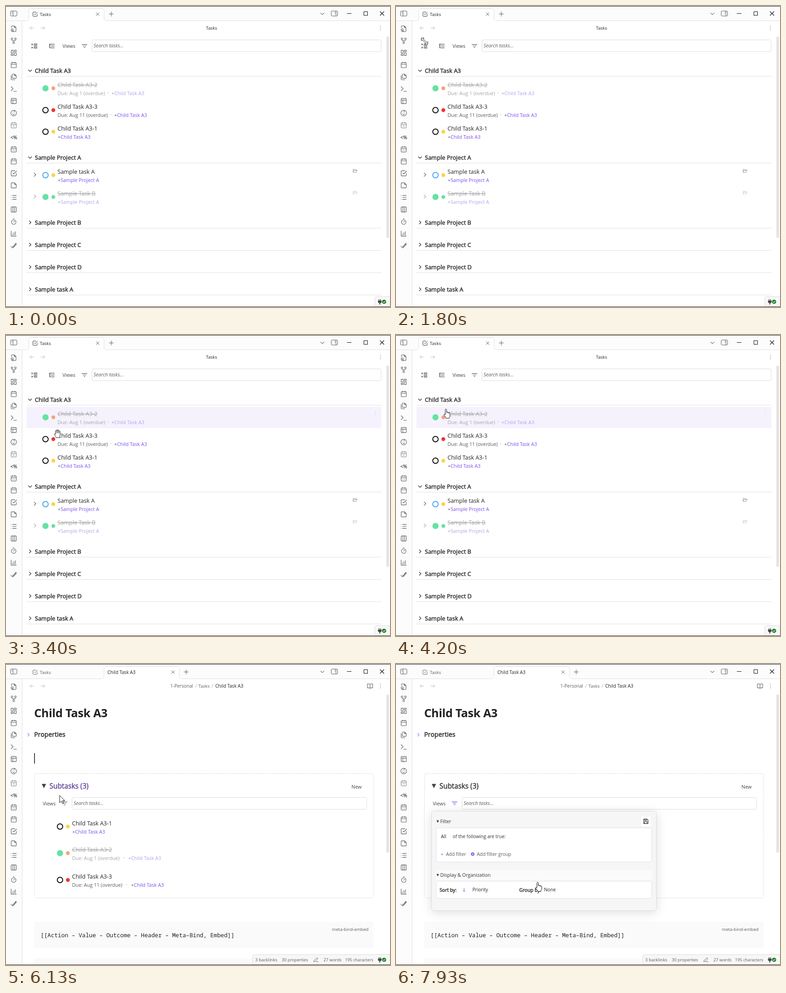
These frames come from a looping animation (846x662 px, 8000 ms). An HTML page:

```html
<!DOCTYPE html>
<html lang="en">
<head>
<meta charset="utf-8">
<title>Tasks</title>
<style>
  html, body { margin: 0; width: 100%; height: 100%; overflow: hidden; background: #fff; }
  svg { display: block; font-family: "Open Sans", "Noto Sans", sans-serif; }
  text { white-space: pre; }
  [data-on] { opacity: 0; }
  #cursor path { fill: #fff; stroke: #111; stroke-width: 1; stroke-linejoin: round; }
  #popup > rect:first-child { filter: drop-shadow(0 4px 11px rgba(0, 0, 0, .13)); }
</style>
</head>
<body>
<svg id="stage" width="846" height="662" viewBox="0 0 846 662"></svg>
<script>
const LOOP = 8000;
const INK = '#222', GREY = '#5c5c5c', FAINT = '#a5a5a5', LINE = '#e0e0e0';
const VIOLET = '#7a4ff0', HOVER = '#5b3f8f', PALE = '#b8a0f0';
const GREEN = '#65e2a2', ORANGE = '#f4a37a', RED = '#f03230', YELLOW = '#f9d546';

// Drawing helpers
const text = (x, y, size, str, fill = INK, extra = '') =>
  `<text x="${x}" y="${y}" font-size="${size}" fill="${fill}" ${extra}>${str}</text>`;
// Medium weight: regular letters with a thin outline
const semi = (x, y, size, str, fill = INK) => text(x, y, size, str, fill, `stroke="${fill}" stroke-width=".4"`);
const box = (x, y, w, h, fill, stroke = 'none', r = 0, extra = '') =>
  `<rect x="${x}" y="${y}" width="${w}" height="${h}" rx="${r}" fill="${fill}" stroke="${stroke}" ${extra}/>`;
const line = (d, stroke = LINE, w = 1) => `<path d="${d}" fill="none" stroke="${stroke}" stroke-width="${w}"/>`;
const dot = (x, y, r, fill, stroke = 'none') =>
  `<circle cx="${x}" cy="${y}" r="${r}" fill="${fill}" stroke="${stroke}" stroke-width="2"/>`;
const group = (on, ...parts) => `<g data-on="${on}">${parts.join('')}</g>`;
const icon = (d, x, y, size = 15, color = GREY, w = 1.75) =>
  `<path d="${d}" transform="translate(${x} ${y}) scale(${size / 24}) translate(-12 -12)" fill="none"
    stroke="${color}" stroke-width="${w}" stroke-linecap="round" stroke-linejoin="round"/>`;
const ring = (x, y, r) => `M${x - r} ${y}a${r} ${r} 0 1 0 ${2 * r} 0a${r} ${r} 0 1 0 ${-2 * r} 0`;
const pane = (x, y, w, h) => `M${x} ${y}h${w}v${h}h${-w}z`;

const frame = 'M5 3h14a2 2 0 0 1 2 2v14a2 2 0 0 1-2 2H5a2 2 0 0 1-2-2V5a2 2 0 0 1 2-2z';
const calendar = 'M8 2v4M16 2v4M3 10h18M5 4h14a2 2 0 0 1 2 2v14a2 2 0 0 1-2 2H5a2 2 0 0 1-2-2V6a2 2 0 0 1 2-2z';
const check = 'M9 11l3 3L22 4M21 12v7a2 2 0 0 1-2 2H5a2 2 0 0 1-2-2V5a2 2 0 0 1 2-2h11';
const cross = 'M18 6L6 18M6 6l12 12', plus = 'M12 4v16M4 12h16';
const right = 'M9 5l7 7-7 7', down = 'M5 9l7 7 7-7';
const back = 'M20 12H4M11 5l-7 7 7 7', forth = 'M4 12h16M13 5l7 7-7 7';
const more = 'M12 5h.01M12 12h.01M12 19h.01';
const funnel = 'M2 6h20M6 12h12M10 18h4';
const folder = 'M2 20V5h6l3 3h9v3M2 20l4-9h17l-4 9z';
const book = 'M12 6v15M12 6q-2-2-5-2H2v15h6q3 0 4 2q1-2 4-2h6V4h-5q-3 0-5 2';
const pencil = 'M12 21h9M4 16L16 4l4 4L8 20l-5 1z';
const floppy = 'M3 3h14l4 4v14H3zM7 3v5h8V3M7 21v-8h10v8';

const ribbon = [
  'M14 2v6h6M5 21q0 1 1 1h12a2 2 0 0 0 2-2V8l-6-6H6a2 2 0 0 0-2 2v4M9 19l3 3' + ring(6.5, 15.5, 3.5),
  ring(12, 19, 3) + ring(6, 5, 3) + ring(18, 5, 3) + 'M18 8v2a2 2 0 0 1-2 2H8a2 2 0 0 1-2-2V8M12 12v4',
  pane(3, 3, 7, 9) + pane(14, 3, 7, 5) + pane(14, 12, 7, 9) + pane(3, 16, 7, 5),
  calendar,
  'M15 2H9a2 2 0 0 0-2 2v11a2 2 0 0 0 2 2h10a2 2 0 0 0 2-2V8zM15 2v6h6M3 7v13a2 2 0 0 0 2 2h11',
  'M3 18l7-7-7-7M12 20h10',
  frame + 'M3 9h18M9 21V9',
  ring(12, 12, 10) + 'M8 12h.01M16 12h.01M9 16q3 2.5 6 0M12 2q5 3 0 6',
  calendar, '', calendar + 'M8 14h.01M12 14h.01M16 14h.01M8 18h.01M12 18h.01M16 18h.01',
  calendar, check,
  'M15 3H5a2 2 0 0 0-2 2v14a2 2 0 0 0 2 2h14a2 2 0 0 0 2-2V9zM15 3v6h6',
  'M8 5h13M8 12h13M8 19h13M3 5h.01M3 12h.01M3 19h.01',
  frame + 'M9 3v18M15 3v18',
  ring(12, 14, 8) + 'M10 2h4M12 14l3-3',
  'M3 3v18h18M8 17v-4M13 17V8M18 17V5',
  'M2 14l5 6L21 4M8 14l2 2L19 4M10 20L22 7'
];

const sideIcon = (x, px) =>
  box(x - 7, 11, 14, 11, 'none', GREY, 2) + line(`M${px} 11v11M${px - 3} 13.5h1.5M${px - 3} 16h1.5`, GREY);

const chrome = () => [
  box(0, 0, 846, 33, '#fcfcfc'), box(0, 33, 35, 629, '#fcfcfc'),
  line('M0 32.5H846M35.5 33V661'),
  sideIcon(17, 15.5), sideIcon(723.5, 727),
  icon(down, 697, 17, 13, INK), line('M751 16.5h10M824 12l9 9M833 12l-9 9', '#111', 1.1),
  box(788.5, 12.5, 8, 8, 'none', '#111'),
  ...ribbon.map((d, i) => icon(d, 17, 50 + 26.5 * i, 15, i === 8 ? '#888' : GREY)),
  text(15.6, 267, 7, '1', GREY), semi(9.5, 292.5, 10.8, '&lt;%', GREY),
].join('');

const nav = () => icon(back, 57, 48.5, 13, '#bbb') + icon(forth, 81, 48.5, 13, '#bbb') + icon(more, 825, 48.5, 14, GREY, 2.6);

const tab = (x, w) =>
  `<path d="M${x - 5} 32.5q5 0 5-5V11q0-5.5 6-5.5h${w - 12}q6 0 6 5.5v16.5q0 5 5 5" fill="#fff" stroke="${LINE}"/>` +
  box(x - 4, 32, w + 8, 1.5, '#fff') + icon(cross, x + w - 14, 18, 13);

const tasksTab = color => icon(check, 64, 18, 12.5, color) + text(74.5, 22, 9.8, 'Tasks', color);

const search = (x, y, w) => box(x + .5, y + .5, w, 26, '#fff', '#ddd', 3) +
  text(x + 4, y + 17, 10.6, 'Search tasks...', GREY, 'font-style="italic"');

// One task row; done rows are struck through and faded. gap widens the space around the separator.
function row(x, y, name, color, state, link, due, gap = 0) {
  const done = state === 'done', side = done ? PALE : VIOLET, sub = done ? FAINT : GREY;
  const at = due ? x + 145.5 + 6 * (due.length - 20) + gap : x + 27;
  return (done ? dot(x, y, 6.8, GREEN) : dot(x, y, 6, '#fff', state === 'open' ? '#111' : '#4aa8f0')) +
    dot(x + 17.3, y, 4.2, color) +
    text(x + 26.5, y - 3, 12.55, name, done ? FAINT : INK, done ? 'text-decoration="line-through"' : '') +
    (due ? text(x + 26.5, y + 15, 10.75, due, sub) + dot(at - 7.5 - gap * .4, y + 10, 1, '#bbb') : '') +
    text(at, y + 15, 10.8, `<tspan fill="${sub}">+</tspan>` + link, side);
}

const dueDone = 'Due: Aug 1 (overdue)', dueLate = 'Due: Aug 11 (overdue)', A3 = 'Child Task A3';

const heading = (y, name, open) =>
  icon(open ? down : right, 53, y, 12, INK, 2.2) + semi(63.5, y + 4.5, 13, name) + line(`M45 ${y + 12.5}H827`);

const rowHover = (on, y) => group(on, box(45, y, 782, 47, '#f5f2fe'), icon(more, 813.5, y + 13.5, 11, '#b5b0c4', 2.6));

const tasksView = () => group('0-4870',
  tab(50, 166), tasksTab(INK), icon(plus, 232, 17.5, 14), nav(), text(440.5, 52, 9.8, 'Tasks'),
  line('M61 84h8M61 88h8M61 92h8', INK, 1.3), line('M56.5 83l2 1.5-2 1.5M56.5 90l2 1.5-2 1.5', INK, 1.1),
  line('M95 84h12M99 88h8M99 92h8M96.5 84v8h2', INK, 1.2),
  text(124.5, 92, 10.7, 'Views', '#444', 'font-weight="500"'), icon(funnel, 173, 88, 13.5, GREY, 2), search(189, 74, 637),
  rowHover('3130-3465 4070-4380', 158), rowHover('3465-3630 3930-4070', 206), rowHover('3630-3930', 254),
  heading(142, A3, true),
  group('3000-3130 4400-4870', semi(63.5, 146.5, 13, A3, HOVER)),
  row(87, 181, A3 + '-2', ORANGE, 'done', A3, dueDone),
  row(87, 229, A3 + '-3', RED, 'open', A3, dueLate),
  row(87, 276.5, A3 + '-1', YELLOW, 'open', A3),
  heading(333, 'Sample Project A', true),
  icon(right, 63.5, 371, 13, GREY, 2), row(87, 372, 'Sample task A', YELLOW, 'active', 'Sample Project A'),
  icon(right, 63.5, 419, 13, FAINT, 2), row(87, 420, 'Sample Task B', GREEN, 'done', 'Sample Project A'),
  icon(folder, 769, 362, 10, '#888', 2), icon(folder, 769, 410, 10, '#c4c4c4', 2),
  heading(476, 'Sample Project B'), heading(525, 'Sample Project C'),
  heading(574, 'Sample Project D'), heading(623, 'Sample task A'),
  box(838, 67, 6, 443, '#e4e4e4', 'none', 3));

const fold = (x, y, s) => `<path d="M${x - s} ${y - s}h${2 * s}l${-s} ${2 * s}z" fill="#444"/>`;

const popup = () => `<g id="popup">` + [
  box(78.5, 323.5, 495, 219, '#f6f6f6', '#ddd', 5),
  fold(92, 346.5, 2.8), text(97.5, 350, 10.2, 'Filter', '#333'),
  box(540, 335, 21, 22, '#fff', 'none', 4), icon(floppy, 550.5, 346, 13, INK, 2),
  box(88.5, 360.5, 475, 75, '#fff', LINE, 4),
  text(99, 383, 10.2, 'All'), text(125, 383, 10.2, 'of the following are true:', '#333'),
  text(98.5, 421.5, 10, '+', VIOLET), text(110, 421.5, 10.4, 'Add filter', GREY),
  dot(169, 418, 3.8, VIOLET), line('M166.5 418h5M169 415.5v5', '#fff', .9), text(178, 421.5, 10.4, 'Add filter group', GREY),
  box(88, 453, 476, 23, '#fafafa'), fold(92, 464.5, 2.8), text(97.5, 468, 10.45, 'Display &amp; Organization', '#333'),
  box(88.5, 477.5, 475, 38, '#fff', LINE, 4),
  semi(96, 500.5, 10.6, 'Sort by:'), line('M150 492.5v8M147.8 498.2l2.2 2.3 2.2-2.3', VIOLET),
  text(168.5, 500, 10.1, 'Priority'), semi(271.5, 500.5, 10.6, 'Group by:'), text(326, 500, 10.3, 'None'),
].join('') + '</g>';

const noteView = () => group('4870-8000',
  tasksTab(GREY), nav(), icon(book, 802, 48.5, 14),
  text(62, 117, 25.3, A3, INK, 'font-weight="700" letter-spacing="-.3"'),
  group('4870-4930', line('M216.5 10v16', '#ccc'), icon(plus, 236.5, 17.5, 14), text(425, 52, 10.5, 'No file')),
  group('4930-8000',
    tab(216, 166), text(223.5, 22, 10.1, A3), icon(plus, 397, 17.5, 14),
    text(362, 52, 10.1, '1-Personal', GREY), text(417, 52, 10.1, '/', FAINT), text(424, 52, 9.8, 'Tasks', GREY),
    text(453, 52, 10.1, '/', FAINT), text(461, 52, 10.1, A3),
    icon(right, 49.5, 155.5, 11, VIOLET, 2.2), semi(62, 160, 14.3, 'Properties'),
    box(62, 567, 748, 58, '#fafafa', 'none', 4), box(62, 647, 748, 14, '#fafafa', 'none', 4),
    text(76, 601, 12.72, '[[Action – Value – Outcome – Header – Meta–Bind, Embed]]', INK,
      `font-family="'Noto Sans Mono', 'DejaVu Sans Mono', monospace"`),
    text(718, 587, 9.6, 'meta-bind-embed', GREY),
    box(838, 67, 6, 348, '#e4e4e4', 'none', 3)),
  group('4930-5530 6110-6600', box(62, 196, 1.5, 23, '#111')),
  group('5070-8000',
    box(62.5, 241, 747.5, 273.5, '#fff', '#ccc', 4, 'stroke-dasharray="2 2"'),
    fold(83.5, 268.5, 4.8),
    group('5070-5970 6230-8000', semi(95.8, 274, 15.4, 'Subtasks (3)', '#2c2c2c')),
    group('5970-6230', semi(95.8, 274, 15.4, 'Subtasks (3)', HOVER)),
    text(761, 274, 10.9, 'New', '#444'), text(81, 311, 10.7, 'Views', '#444', 'font-weight="500"'),
    group('5070-7070', icon(funnel, 129, 306.5, 13.5, GREY, 2)), search(145, 293, 649)),
  group('5200-8000',
    row(119, 357.5, A3 + '-1', YELLOW, 'open', A3),
    row(119, 416, A3 + '-2', ORANGE, 'done', A3, dueDone, 5),
    row(119, 475, A3 + '-3', RED, 'open', A3, dueLate, 5)),
  group('7070-8000', icon(funnel, 129, 306.5, 13.5, VIOLET, 2)),
  group('7070-7130*.5 7130-7200*.85 7200-8000', popup()));

const status = () => {
  const bar = x => `<path d="M${x}.5 661v-17q0-5 5-5H846V661z" fill="#f7f7f7" stroke="#ddd"/>`;
  return bar(812) + group('4930-8000', bar(543),
    text(549, 654, 9.5, '3 backlinks', GREY), text(607.5, 654, 9.3, '30 properties', GREY), icon(pencil, 683, 650, 12.5),
    text(699.5, 654, 9.35, '27 words', GREY), text(747, 654, 9.1, '195 characters', GREY)) +
    '<path d="M819.5 648h8v2q0 3-3 3.5v3h-2v-3q-3-.5-3-3.5zM821 645h1.5v3H821zM824.5 645h1.5v3h-1.5z" fill="#444"/>' +
    dot(833, 650.5, 4.6, '#15801c') + line('M831 650.5l1.6 1.6 2.8-3', '#fff', 1.2) +
    line('M0 .5H846M0 661.5H846', '#333');
};

// Pointer shapes, each with its hot spot at 0,0
const pointers = [
  ['400-2070', 'M-7-7h6l-2 2 8 8 2-2v6h-6l2-2-8-8-2 2z'],
  ['2070-3000 5970-6400', 'M0 0V16L3.8 12.5 6.3 18 8.8 17 6.4 11.5H11.5z'],
  ['3130-4140', 'M-4.5 2V-5.5a1.3 1.3 0 0 1 2.6 0V-7a1.3 1.3 0 0 1 2.6 0v.7a1.3 1.3 0 0 1 2.6 0V-4.5a1.3 1.3 0 0 1 2.5 0V3c0 3-1 4-1.5 6H-3C-3.5 7-5.5 5-6.5 2.5-7.5.5-6 0-4.5 2zM-1.9-5.5V-1M.7-6.3V-1M3.3-4.5V-1'],
  ['3000-3130 4140-4870 6400-8000', 'M-1.5 1.5a1.5 1.5 0 0 1 3 0V8 7c.3-1.3 2.8-1 2.8.6v1-1c.4-1 2.4-.7 2.5.8v1-1c.6-.8 2.2-.4 2.2 1V14c0 3-1.5 4-2 6H0c-.5-2-2.5-4.5-4-7-1-1.8.7-2.8 2.5-.8z'],
  ['4870-5970', 'M-3-7.5h2l1 1 1-1h2M0-6.5V6.5M-3 7.5h2l1-1 1 1h2'],
];
const pointer = () => '<g id="cursor">' +
  pointers.map(([on, d]) => group(on, `<path d="${d}"/>`)).join('') + '</g>';

const route = [
  [0, 17, 37], [400, 17, 37], [530, 36, 60], [600, 46, 69], [730, 53, 76], [870, 53, 76], [1070, 76, 91],
  [1330, 50, 65], [1600, 61, 76], [1730, 62, 77], [1800, 63, 77.5], [2000, 44, 57], [2470, 149, 63],
  [2600, 149, 63], [2930, 128, 120], [3070, 122, 146], [3200, 116, 180], [3400, 113.5, 216.5],
  [3700, 100, 268], [3800, 90, 282], [4000, 97, 235], [4200, 110, 163], [4330, 112, 162],
  [4470, 121, 148], [5670, 121, 148], [6130, 118, 289], [6470, 129, 305], [7470, 129, 305],
  [7600, 150, 350], [7770, 250, 440], [7930, 312, 480], [8000, 312, 480]
];

const stage = document.getElementById('stage');
stage.innerHTML = chrome() + tasksView() + noteView() + status() + pointer();

// Build keyframes from the visible spans ("from-to" or "from-to*opacity") and the pointer route.
const pct = ms => (ms / LOOP * 100).toFixed(3) + '%';
let css = `@keyframes move{${route.map(([t, x, y]) => `${pct(t)}{transform:translate(${x}px,${y}px)}`).join('')}}
  #cursor{animation:move ${LOOP}ms linear infinite}`;
stage.querySelectorAll('[data-on]').forEach((el, i) => {
  const keys = { 0: 0 };
  for (const span of el.dataset.on.split(' ')) {
    const [range, alpha = 1] = span.split('*'), [from, to] = range.split('-');
    keys[from] = alpha;
    keys[to] = +to === LOOP ? alpha : 0;
  }
  keys[LOOP] ??= 0;
  const steps = Object.entries(keys).map(([t, o]) => `${pct(t)}{opacity:${o}}`).join('');
  el.id = 'span' + i;
  css += `@keyframes on${i}{${steps}}#span${i}{animation:on${i} ${LOOP}ms step-end infinite}`;
});
document.head.append(Object.assign(document.createElement('style'), { textContent: css }));
</script>
</body>
</html>
```
